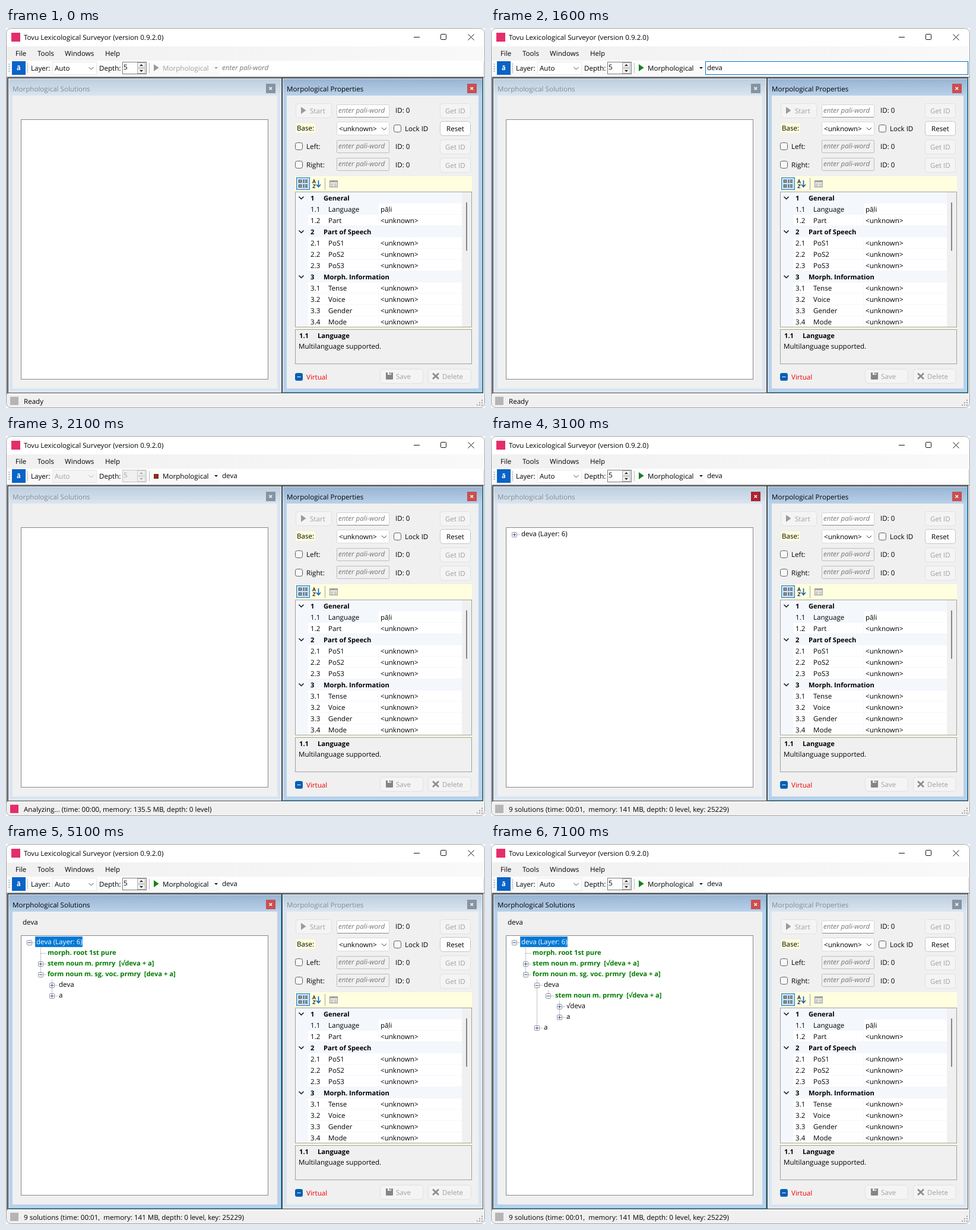
These frames come from a looping animation (807 by 641 pixels, 8 s). An HTML page:

```html
<!DOCTYPE html>
<html lang="en">
<head>
<meta charset="utf-8">
<title>Tovu Lexicological Surveyor</title>
<style>
html, body { margin: 0; width: 100%; height: 100%; overflow: hidden; background: #fff; }
svg { display: block; width: 807px; height: 641px; }
text { font: 11.6px "Open Sans", "Noto Sans", sans-serif; fill: #000; white-space: pre; text-rendering: geometricPrecision; }
.b { font-weight: 700; font-size: 11.2px; }
.i { font-style: italic; fill: #757575; }
.off { fill: #a0a0a0; }
.dim { fill: #838b94; }
.green { fill: #007a00; }
.white { fill: #fff; }
.red { fill: #f00000; }
</style>
</head>
<body>
<svg id="stage" viewBox="0 0 807 641" xmlns="http://www.w3.org/2000/svg"></svg>
<script>
const LOOP = 8000;

// Drawing helpers return SVG markup; text is placed by the middle of its row.
const escape = s => s.replace(/&/g, '&amp;').replace(/</g, '&lt;');
const text = (x, mid, s, cls = '') => `<text x="${x}" y="${mid + 4}" class="${cls}">${escape(s)}</text>`;
const fill = (x, y, w, h, color, r = 0) => `<rect x="${x}" y="${y}" width="${w}" height="${h}" rx="${r}" fill="${color}"/>`;
const box = (x, y, w, h, color, edge, r = 0) =>
  `<rect x="${x + .5}" y="${y + .5}" width="${w - 1}" height="${h - 1}" rx="${r}" fill="${color}" stroke="${edge}"/>`;
const line = (d, color, width = 1, more = '') => `<path d="${d}" fill="none" stroke="${color}" stroke-width="${width}" ${more}/>`;
const shape = (d, color) => `<path d="${d}" fill="${color}"/>`;
const chevron = (x, y, color = '#444', width = 1) => line(`M${x - 4} ${y - 2}l4 4l4 -4`, color, width);
const during = (ranges, ...parts) => `<g data-on="${ranges}">${parts.join('')}</g>`;
const gradient = (id, from, to, across) =>
  `<linearGradient id="${id}" x2="${across ? 1 : 0}" y2="${across ? 0 : 1}"><stop stop-color="${from}"/><stop offset="1" stop-color="${to}"/></linearGradient>`;

function windowChrome() {
  return fill(0, 0, 807, 641, '#fff') + fill(1, 31, 805, 52, 'url(#menu)') +
    fill(9, 8, 15, 15, '#e52d6b') +
    text(30, 16, 'Tovu Lexicological Surveyor (version 0.9.2.0)') +
    line('M687 15.5h10M778.5 10.5l10 10m0-10l-10 10', '#111') +
    `<rect x="732.5" y="10.5" width="9" height="9" rx="1" fill="none" stroke="#111"/>` +
    text(16, 43, 'File') + text(53, 43, 'Tools') + text(99, 43, 'Windows') + text(167, 43, 'Help');
}

function layerControls(enabled) {
  const cls = enabled ? '' : 'off', ink = enabled ? '#444' : '#aaa';
  return box(78, 57, 75, 22, enabled ? '#fff' : '#f4f4f4', '#e6e6e6') + text(82, 68, 'Auto', cls) + chevron(143.5, 68, ink) +
    box(196, 57, 41, 21, enabled ? '#fff' : '#f0f0f0', enabled ? '#7a7a7a' : '#c4c4c4') + text(198, 66, '5', cls) +
    [58, 68].map(y => box(221, y, 14, 9, '#f0f0f0', enabled ? '#adadad' : '#ccc')).join('') +
    shape('M225 64l3-3l3 3zM225 71l3 3l3-3z', enabled ? '#222' : '#aaa');
}

const play = (x, y, color) => shape(`M${x} ${y - 6}l8.5 6l-8.5 6z`, color);

function toolbar() {
  const typing = ['d', 'de', 'dev'].map((s, k) => during([[1000 + 200 * k, 1200 + 200 * k]], text(364, 67, s)));
  return fill(2, 55, 803, 26, 'url(#strip)', 2) +
    line('M5.5 60v16', '#a6adb5', 2, 'stroke-dasharray="2 2"') +
    fill(10, 56, 23, 23, '#0a63c6') + text(18, 67, 'ā', 'white b') +
    line('M36.5 59v17M241.5 59v17', '#bdbdbd') +
    text(42, 68, 'Layer:') + text(157, 68, 'Depth:') +
    during([[0, 2000], [3100, LOOP]], layerControls(true)) +
    during([[2000, 3100]], layerControls(false)) +
    during([[1800, 2000]], box(243, 56, 117, 23, '#b3d7f3', '#0078d7'), line('M347.5 56v23', '#0078d7')) +
    during([[0, 1000]], play(249, 67, '#9a9a9a'), text(264, 68, 'Morphological', 'off'),
      shape('M351 66h6l-3 3z', '#999'), fill(361, 56, 443, 23, '#fff'), text(364, 67, 'enter pali-word', 'i')) +
    during([[1000, 2000], [3100, LOOP]], play(249, 67, '#17801f')) +
    during([[2000, 3100]], fill(249, 64, 8, 8, '#7c2a14'), line('M252.5 64v8M249 67.5h8', '#9c4630', .6)) +
    during([[1000, LOOP]], text(264, 68, 'Morphological'), shape('M351 66h6l-3 3z', '#111')) +
    during([[1000, 1800]], box(361, 56, 443, 23, '#fff', '#0078c8')) +
    during([[1800, LOOP]], fill(361, 56, 443, 23, '#fff')) +
    typing.join('') + during([[1600, LOOP]], text(364, 67, 'deva')) +
    line('M804.5 57v22', '#d4d4d4');
}

function closeButton(x, color) {
  return fill(x, 94, 16, 16, color) + line(`M${x + 5.5} 99.7l4.6 4.6m0-4.6l-4.6 4.6`, '#fff', 1.4);
}

function panel(x, w, title, active) {
  const far = x + w - 1.5;
  return box(x, 84, w, 532, active ? '#b9d1ea' : '#dae5f0', active ? '#2f3338' : '#4c4f53') +
    fill(x + 1, 85, w - 2, 29, active ? 'url(#active)' : 'url(#idle)') +
    line(`M${x + 1.5} 615V85.5H${far}`, active ? '#e4eef8' : '#eaf1f7') +
    line(`M${far} 86V614.5H${x + 2}`, active ? '#39bfe6' : '#eaf1f7') +
    fill(x + 8, 114, w - 16, 494, '#f0f0f0') +
    text(x + 8, 103, title, active ? '' : 'dim') +
    closeButton(x + w - 27, active ? '#c94f4f' : '#8793a0');
}

function panels() {
  const left = on => panel(3, 462, 'Morphological Solutions', on);
  const right = on => panel(465, 339, 'Morpological Properties', on);
  return box(1, 82, 805, 536, '#fff', '#fff') +
    line('M1.5 618V82.5H806', '#a0a0a0') + line('M2.5 617V83.5H805', '#696969') +
    line('M804.5 84V616.5H3', '#e3e3e3') +
    during([[0, 4100]], left(false), right(true)) +
    during([[4100, LOOP]], left(true), right(false)) +
    during([[3100, 4100]], closeButton(438, '#ab2430'));
}

// Rows are [level, label, state] with state '+', '-' or '' for a leaf.
function tree(rows) {
  const midOf = k => 165 + 18 * k;
  const xOf = level => 39.5 + 19 * level;
  const dots = d => line(d, '#8c8c8c', 1, 'stroke-dasharray="1 1"');
  let links = '', nodes = '';
  rows.forEach(([level, label, state], k) => {
    const x = xOf(level), mid = midOf(k), y = mid + 1.5;
    links += dots(`M${x} ${y}h9`);
    if (level) {
      let parent = k;
      while (rows[parent][0] >= level) parent--;
      links += dots(`M${x} ${midOf(parent) + 10}V${y}`);
    }
    if (state) {
      nodes += box(x - 4.5, mid - 3, 9, 9, '#fafafa', '#8e9299', 1) +
        line(`M${x - 2.5} ${y}h5` + (state === '+' ? `M${x} ${y - 2.5}v5` : ''), '#3a4a9a');
    }
    const selected = k === 0 && state === '-';
    if (selected) nodes += box(49, 156, 80, 18, '#0078d7', '#2b8fe0');
    const cls = selected ? 'white' : label.includes('m') ? 'b green' : '';
    nodes += text(x + 11.5, mid, label, cls);
  });
  return links + nodes;
}

function solutions() {
  const stem = 'stem noun m. prmry  [√deva + a]';
  const head = state => [[0, 'deva (Layer: 6)', '-'], [1, 'morph. root 1st pure', ''],
    [1, stem, '+'], [1, 'form noun m. sg. voc. prmry  [deva + a]', state]];
  const tail = [2, 'a', '+'];
  return box(25, 154, 417, 439, '#fff', '#82878f') +
    during([[3100, 4100]], tree([[0, 'deva (Layer: 6)', '+']])) +
    during([[4100, LOOP]], text(28, 132, 'deva')) +
    during([[4100, 5100]], tree(head('+'))) +
    during([[5100, 6100]], tree([...head('-'), [2, 'deva', '+'], tail])) +
    during([[6100, 7100]], tree([...head('-'), [2, 'deva', '-'], [3, stem, '+'], tail])) +
    during([[7100, LOOP]], tree([...head('-'), [2, 'deva', '-'], [3, stem, '-'], [4, '√deva', '+'], [4, 'a', '+'], tail]));
}

const button = (x, y, w, label, textX, enabled) =>
  box(x, y, w, 25, enabled ? '#fdfdfd' : '#f4f4f4', enabled ? '#c6c6c6' : '#e1e1e1', 4) +
  text(textX, y + 12.5, label, enabled ? '' : 'off');
const checkbox = (x, y) => box(x, y, 13, 13, '#f8f8f8', '#5f5f5f', 3);
const wordField = (y, enabled) =>
  box(557, y, 89, 22, enabled ? '#fff' : '#f0f0f0', enabled ? '#d4d4d4' : '#bcbcbc', 1) +
  (enabled ? line(`M558 ${y + 21.5}h87`, '#868686') : '') + text(560, y + 10, 'enter pali-word', 'i');

function wordForm() {
  return button(488, 127, 61, 'Start', 512, false) + play(497, 139, '#9a9a9a') +
    wordField(129, true) + wordField(189, false) + wordField(219, false) +
    [139, 200, 231].map(y => text(656, y, 'ID: 0') + button(731, y - 12, 52, 'Get ID', 740, false)).join('') +
    fill(488, 161, 33, 16, '#ffffdc') + text(490, 169, 'Base:') +
    box(557, 158, 89, 23, '#fff', '#d9d9d9', 2) + text(561, 170, '<unknown>') + chevron(637, 170) +
    checkbox(653, 163) + text(672, 170, 'Lock ID') + button(731, 157, 52, 'Reset', 742, true) +
    checkbox(487, 193) + text(506, 200, 'Left:') + checkbox(487, 224) + text(506, 231, 'Right:');
}

function gridToolbar() {
  let rows = '';
  for (const y of [256, 264]) {
    rows += box(493, y, 5, 5, '#fff', '#333') + line(`M494 ${y + 2.5}h3`, '#333') +
      line(`M500 ${y + .5}h3m1 0h4M500 ${y + 2.5}h3m1 0h4M500 ${y + 4.5}h3m1 0h4`, '#333');
  }
  return fill(487, 250, 298, 259, '#ffffe0') + box(489, 252, 23, 21, '#c4e0f7', '#1a78c4') + rows +
    line('M516.5 262l2.5-6l2.5 6m-4-2h3M517 264.5h4l-4 5h4', '#222', 1.1) +
    line('M526.5 257v10m-3.5-3l3.5 4l3.5-4', '#0b63b5', 1.6) +
    line('M537.5 253v20', '#a9a990') +
    box(545, 257, 14, 12, '#e6e6de', '#a0a0a0') + fill(545, 257, 14, 3, '#a0a0a0') +
    line('M547 263.5h4m2 0h4M547 266.5h4m2 0h4', '#a0a0a0');
}

function propertyGrid() {
  const groups = [['General', 'Language', 'Part'], ['Part of Speech', 'PoS1', 'PoS2', 'PoS3'],
    ['Morph. Information', 'Tense', 'Voice', 'Gender', 'Mode']];
  const tint = '#f4f7fc';
  let out = fill(487, 276, 298, 229, '#fff') + fill(488, 277, 21, 227, tint), y = 277;
  groups.forEach(([name, ...items], g) => {
    out += fill(488, y, 280, 19, tint) + chevron(497.5, y + 9.5, '#111', 1.5) +
      text(513, y + 10, `${g + 1}`, 'b') + text(535, y + 10, name, 'b');
    items.forEach((item, k) => {
      y += 19;
      const chosen = item === 'Language';
      out += (chosen ? fill(509, y, 119, 19, tint) : '') +
        line(`M509 ${y + 18.5}h259M627.5 ${y}v19`, tint) +
        text(513, y + 10, `${g + 1}.${k + 1}`) + text(543, y + 10, item) +
        text(631, y + 10, chosen ? 'pāḷi' : '<unknown>');
    });
    y += 19;
  });
  return out + fill(768, 277, 16, 227, '#f0f0f0') + fill(775, 294, 2, 82, '#858585', 1) +
    box(487, 276, 298, 229, 'none', '#a0a0a0') + box(487, 508, 298, 59, '#f0f0f0', '#a0a0a0') +
    text(494, 519, '1.1', 'b') + text(525, 519, 'Language', 'b') + text(493, 537, 'Multilanguage supported.');
}

function actions() {
  return fill(487, 582, 13, 13, '#0460b4', 3) + line('M490.5 588.5h6', '#fff') + text(506, 589, 'Virtual', 'red') +
    button(630, 575, 73, 'Save', 657, false) + button(711, 575, 73, 'Delete', 735, false) +
    fill(640, 581, 12, 12, '#858585', 1) + fill(643, 581, 6, 4, '#f4f4f4') + fill(646, 581, 2, 3, '#858585') +
    line('M719 582.5l10 9.5m0-9.5l-10 9.5', '#8a8a8a', 2.6);
}

function statusBar() {
  let grip = '';
  for (let r = 0; r < 3; r++) for (let c = 2 - r; c < 3; c++) grip += fill(793 + 4 * c, 627 + 4 * r, 2, 2, '#a3a3a3');
  return fill(1, 618, 805, 22, '#f0f0f0') + grip +
    during([[0, 2000], [3100, LOOP]], fill(7, 622, 14, 14, '#b5b5b5')) +
    during([[2000, 3100]], fill(7, 622, 14, 14, '#e52d6b')) +
    during([[0, 2000]], text(30, 630, 'Ready')) +
    during([[2000, 3100]], text(30, 630, 'Analyzing... (time: 00:00, memory: 135.5 MB, depth: 0 level)')) +
    during([[3100, LOOP]], text(30, 630, '9 solutions (time: 00:01,  memory: 141 MB, depth: 0 level, key: 25229)'));
}

const stage = document.getElementById('stage');
stage.innerHTML = '<defs>' + gradient('menu', '#f0f0f0', '#f9f9f9', true) + gradient('strip', '#fdfdfd', '#f8f8f8') +
  gradient('active', '#97b3d1', '#b9d1ea') + gradient('idle', '#bccddd', '#dae5f0') +
  '<clipPath id="frame"><rect width="807" height="641" rx="8"/></clipPath></defs>' +
  '<g clip-path="url(#frame)">' + windowChrome() + toolbar() + panels() + solutions() + wordForm() +
  gridToolbar() + propertyGrid() + actions() + statusBar() + '</g>' +
  '<rect x=".5" y=".5" width="806" height="640" rx="8" fill="none" stroke="#a2a2a2"/>';

const timed = [...stage.querySelectorAll('[data-on]')].map(node => {
  const n = node.dataset.on.split(',').map(Number);
  return { node, on: t => n.some((from, k) => k % 2 === 0 && t >= from && t < n[k + 1]) };
});

function render(now) {
  const t = now % LOOP;
  for (const { node, on } of timed) node.style.display = on(t) ? '' : 'none';
  requestAnimationFrame(() => render(performance.now() - start));
}
const start = performance.now();
render(0);
</script>
</body>
</html>
```
